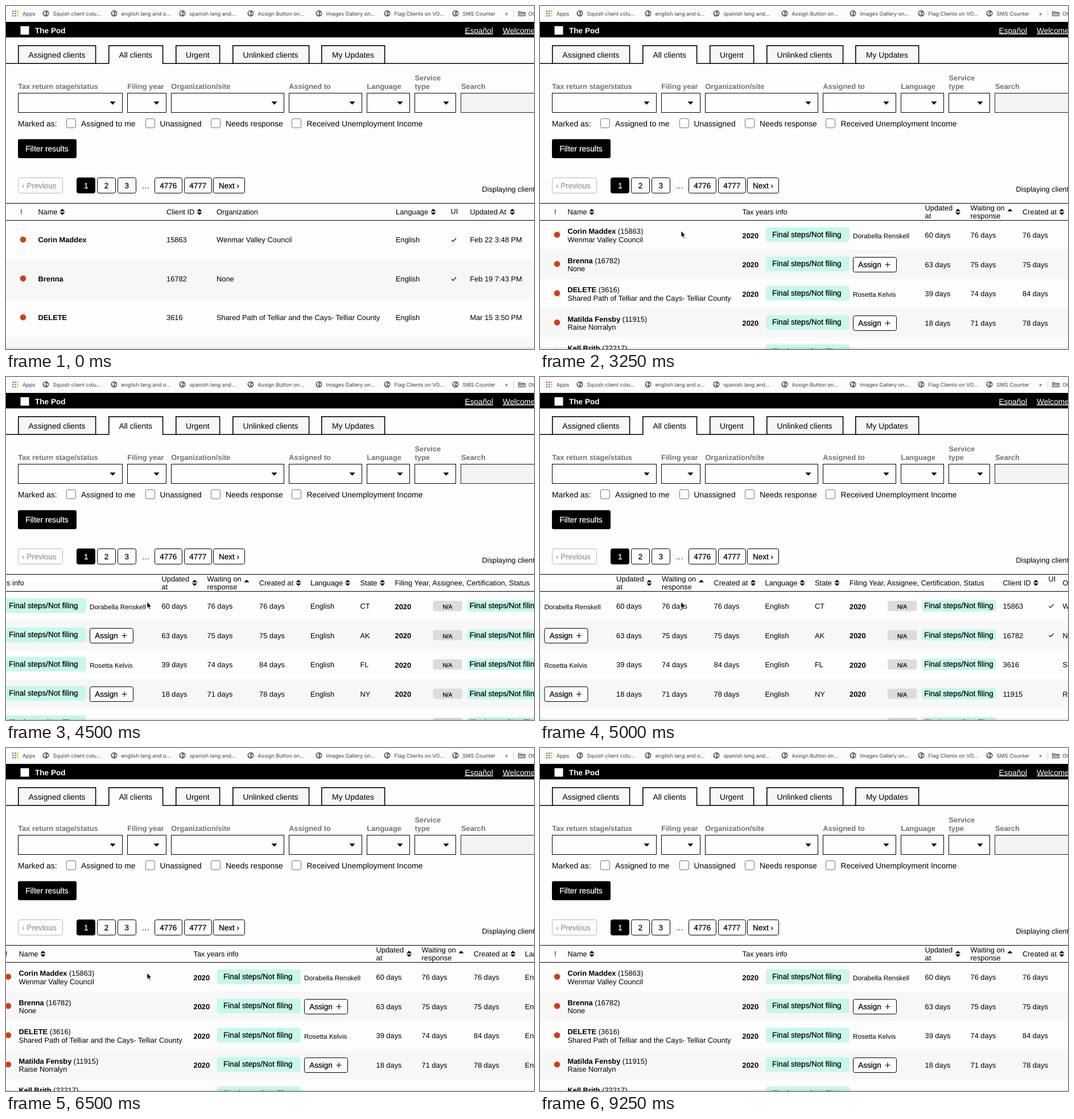
An HTML page for the animation above (9750 ms loop, 928 px wide and 604 px high).

```html
<!DOCTYPE html>
<html lang="en">
<head>
<meta charset="utf-8">
<title>Client list</title>
<style>
  html, body { margin: 0; width: 100%; height: 100%; overflow: hidden; background: #fdfdfd; }
  svg { display: block; width: 928px; height: 604px; }
  text { font: 12.85px "Liberation Sans", Arial, sans-serif; text-rendering: geometricPrecision; white-space: pre; }
  .ui { font-size: 13.85px; }
  .bold { font-weight: 700; }
  .label { font-weight: 700; fill: #737373; }
  .medium { font-size: 13.5px; stroke: #000; stroke-width: .25px; }
  .button { font-size: 13.85px; }
  .light { fill: #fff; stroke: #fff; }
  .off { fill: #999; stroke: #999; }
  .small { font-size: 11.8px; }
  .tag { font-size: 10.2px; stroke: #000; stroke-width: .25px; }
  .mark { font: 9.2px Inter, Roboto, sans-serif; fill: #3c4043; }
  .brand { font-size: 13.6px; font-weight: 700; fill: #fff; }
  .link { font-size: 13.7px; fill: #fff; text-decoration: underline; }

  #page, #wide, #squished, #scroller, #pointer { animation: 9.75s step-end infinite; }
  #wide { animation-name: leave; }
  #squished { animation-name: enter; }
  #scroller { animation-name: scroll; }
  #page { animation-name: bounce; }
  #pointer { animation-name: point; }

  @keyframes leave { 0% { visibility: visible; } 20.51%, 100% { visibility: hidden; } }
  @keyframes enter { 0% { visibility: hidden; } 20.51%, 100% { visibility: visible; } }
  @keyframes scroll {
    0% { transform: translate(0, 0); }
    33.33% { transform: translate(0, 0); animation-timing-function: steps(5, end); }
    46.15% { transform: translate(-403px, 0); animation-timing-function: steps(4, end); }
    56.41% { transform: translate(-682px, 0); }
    64.1% { transform: translate(-290px, 0); }
    66.66% { transform: translate(-26px, 0); }
    69.23%, 100% { transform: translate(0, 0); }
  }
  @keyframes bounce {
    0% { transform: translate(0, 0); }
    69.23% { transform: translate(4px, 0); }
    71.79% { transform: translate(2px, 0); }
    74.35% { transform: translate(1px, 0); }
    76.92%, 100% { transform: translate(0, 0); }
  }
  @keyframes point {
    0% { opacity: 0; transform: translate(541px, 207px); }
    2.56% { opacity: 1; transform: translate(541px, 207px); }
    5.12% { opacity: 1; transform: translate(450px, 145px); }
    7.69% { opacity: 1; transform: translate(285px, 58px); }
    10.25% { opacity: 1; transform: translate(160px, 9px); }
    12.82% { opacity: 1; transform: translate(121px, 14px); }
    15.38% { opacity: 1; transform: translate(118px, 14px); }
    23.07% { opacity: 1; transform: translate(182px, 95px); }
    25.64% { opacity: 1; transform: translate(238px, 205px); }
    28.2% { opacity: 1; transform: translate(247px, 366px); }
    30.76% { opacity: 1; transform: translate(248px, 396px); }
    76.92% { opacity: 1; transform: translate(248px, 250px); }
    79.48% { opacity: 1; transform: translate(249px, 147px); }
    84.61%, 100% { opacity: 0; transform: translate(249px, 147px); }
  }
</style>
</head>
<body>
<svg id="stage" viewBox="0 0 928 604" xmlns="http://www.w3.org/2000/svg">
  <defs>
    <linearGradient id="shade" x1="0" y1="0" x2="0" y2="1">
      <stop offset="0" stop-opacity="0"/>
      <stop offset="1" stop-opacity=".1"/>
    </linearGradient>
    <g id="globe">
      <circle r="5.6" fill="#5f6368"/>
      <path d="M-3.9-1.8Q-2.2-4-.4-3.6L.3-2.2-1.6-.6.2.8-.6 3.6Q-3.4 3-3.9-1.8ZM1.6-1.4 4-1.8Q4.8 1 2.6 3L1.4.8Z" fill="#f3f3f3"/>
    </g>
    <path id="up" d="M-4.6 0 0-4.4 4.6 0Z"/>
    <g id="sort"><use href="#up" y="-1"/><use href="#up" y="-1" transform="scale(1 -1)"/></g>
    <path id="check" d="M-4 .4-1.4 3 4.2-2.8" fill="none" stroke="#000" stroke-width="1.2"/>
  </defs>
  <g id="page"></g>
  <g id="bookmarks"></g>
  <rect y="600" width="928" height="4" fill="url(#shade)"/>
  <path id="pointer" d="M0 0V11.2L2.5 8.9 4.2 13 6 12.2 4.3 8.2H7.6Z" stroke="#fff" stroke-width=".8"/>
</svg>
<script>
const text = (x, y, s, cls = '') => `<text x="${x}" y="${y}" class="${cls}">${s}</text>`;
const box = (x, y, w, h, fill = 'none', r = 0, stroke = 'none', sw = 1) =>
  `<rect x="${x}" y="${y}" width="${w}" height="${h}" rx="${r}" fill="${fill}" stroke="${stroke}" stroke-width="${sw}"/>`;
const use = (id, x, y) => `<use href="#${id}" x="${x}" y="${y}"/>`;
const dot = y => `<circle cx="30" cy="${y}" r="5.3" fill="#d13f12"/>`;
const rule = (x, y, w, h = 1) => box(x, y, w, h, '#000');
const each = (list, fn) => list.map(fn).join('');

const clients = [
  { name: 'Corin Maddex', id: 15863, org: 'Wenmar Valley Council', owner: 'Dorabella Renskell',
    days: [60, 76, 76], state: 'CT', ui: true, at: 'Feb 22 3:48 PM' },
  { name: 'Brenna', id: 16782, org: 'None', days: [63, 75, 75], state: 'AK', ui: true, at: 'Feb 19 7:43 PM' },
  { name: 'DELETE', id: 3616, org: 'Shared Path of Telliar and the Cays- Telliar County', owner: 'Rosetta Kelvis',
    days: [39, 74, 84], state: 'FL', at: 'Mar 15 3:50 PM' },
  { name: 'Matilda Fensby', id: 11915, org: 'Raise Norralyn', days: [18, 71, 78], state: 'NY' },
  { name: 'Kell Brith', id: 22217, org: 'None', owner: 'Dorabella Renskell', days: [18, 71, 78], state: 'NY' }
];

function bookmarks() {
  const names = ['Squish client colu...', 'english lang and o...', 'spanish lang and...', 'Assign Button on...',
    'Images Gallery on...', 'Flag Clients on VO...', 'SMS Counter'];
  const colors = ['#ea4335', '#ea4335', '#f29900', '#34a853', '#4285f4', '#fbbc04', '#34a853', '#4285f4', '#fbbc04'];
  return box(0, 0, 928, 28, '#fcfcfc') +
    each(colors, (c, i) => box(11 + i % 3 * 4, 8 + Math.floor(i / 3) * 4, 2.5, 2.5, c, .8)) +
    text(29, 16.5, 'Apps', 'mark') +
    each(names, (s, i) => use('globe', 70 + i * 120, 13) + text(82.5 + i * 120, 16.5, s, 'mark')) +
    text(877, 16.5, '»', 'mark') + box(892, 7, 1, 13, '#d0d0d0') +
    '<path d="M900.5 9.5h4l1.5 1.5h6.5v6.5h-12z" fill="#bdbdbd" stroke="#5f6368"/><path d="M900.5 12.5h12" stroke="#5f6368"/>' +
    text(918, 16.5, 'Other', 'mark');
}

function header() {
  const tabs = [[21, 137, 39.5, 'Assigned clients'], [180, 96, 198.5, 'All clients'], [298, 78, 316, 'Urgent'],
    [398, 135, 416.5, 'Unlinked clients'], [554, 112, 573, 'My Updates']];
  return box(-20, 28, 980, 27.3, '#000') + box(25.5, 35.5, 15, 15, '#fff') +
    text(51, 47.5, 'The Pod', 'brand') +
    text(806.5, 47.5, 'Español', 'link') + text(873, 47.5, 'Welcome', 'link') +
    rule(-20, 100.5, 980, 1.5) +
    each(tabs, ([x, w, tx, s], i) =>
      box(x + .8, 69.8, w - 1.2, 31.4, i === 1 ? '#fdfdfd' : '#f7f7f7', 0, '#000', 1.6) +
      (i === 1 ? box(x + 1.6, 99, w - 2.8, 5, '#fdfdfd') : '') + text(tx, 90.5, s, 'ui'));
}

function filters() {
  const selects = [[21, 205, 'Tax return stage/status'], [213, 282, 'Filing year'], [290, 489, 'Organization/site'],
    [497, 626, 'Assigned to'], [634, 710, 'Language'], [718, 791, '']];
  const checks = [[106, 132, 'Assigned to me'], [245, 270.5, 'Unassigned'], [360, 386, 'Needs response'],
    [502, 528.5, 'Received Unemployment Income']];
  return each(selects, ([a, b, s]) => text(a + .3, 146, s, 'label') +
      box(a + .5, 153.5, b - a - 1, 34, '#fefefe', 0, '#000') +
      `<path d="M${b - 22.5} 168.2h10l-5 5.5z"/>`) +
    text(718.5, 131, 'Service', 'label') + text(718.5, 146, 'type', 'label') + text(800, 146, 'Search', 'label') +
    box(799.5, 153.5, 160, 34, '#f4f4f4', 0, '#222') + box(800, 154, 160, 1, '#d5d5d5') +
    text(21, 212, 'Marked as:', 'ui') +
    each(checks, ([x, tx, s]) => box(x + .5, 198.5, 16, 16, '#fff', 2.5, '#767676') + text(tx, 212, s, 'ui')) +
    box(21, 234.5, 103, 33.5, '#000', 3) + text(34.3, 256, 'Filter results', 'medium button light');
}

function pager() {
  const pages = [[124, 157, 137, '1'], [160, 193, 172.7, '2'], [196, 229, 208.6, '3'],
    [261, 310, 270.2, '4776'], [313, 362, 322.2, '4777'], [364, 420, 374, 'Next ›']];
  return box(21.5, 302.5, 78, 27, 'none', 3, '#b8b8b8') + text(28, 320.6, '‹ Previous', 'medium off') +
    each(pages, ([a, b, tx, s], i) => box(a + .5, 302.5, b - a - 1, 27, i ? 'none' : '#000', 3, '#000') +
      text(tx, 320.6, s, 'medium' + (i ? '' : ' light'))) +
    text(238.5, 320.6, '…', 'ui') + text(836.5, 327, 'Displaying clients');
}

const frame = () => rule(-20, 347, 2400) + rule(-20, 377, 2400);

function wideTable() {
  const heads = [[25, 367, '!'], [56.5, 367, 'Name', 99], [282, 367, 'Client ID', 340], [370, 366.5, 'Organization'],
    [685, 367, 'Language', 751], [781.5, 365.5, 'UI'], [815.5, 367, 'Updated At', 890]];
  return box(-20, 447, 2400, 68.5, '#f7f7f7') + box(-20, 584, 2400, 30, '#f7f7f7') + frame() +
    each(heads, ([x, y, s, icon]) => text(x, y, s) + (icon ? use('sort', icon, 362.5) : '')) +
    each(clients.slice(0, 3), (c, i) => {
      const y = 416.3 + i * 68.5;
      return dot(y - 5) + text(56.5, y, c.name, 'bold') + text(282, y, c.id) + text(370, y, c.org) +
        text(685, y, 'English') + (c.ui ? use('check', 787, y - 4.5) : '') + text(815.5, y, c.at);
    });
}

function squishedRow(c, i) {
  const y = 378 + i * 51.5;
  const owner = c.owner ? text(550, y + 31, c.owner, 'small')
    : box(550.5, y + 13, 76, 26, '#fefefe', 3, '#000') + text(559.3, y + 30.3, 'Assign', 'medium') +
      `<path d="M606.5 ${y + 26}h9m-4.5-4.5v9" stroke="#000" stroke-width="1.1"/>`;
  return (i % 2 ? box(-20, y, 2400, 51.5, '#f7f7f7') : '') + dot(y + 24.8) +
    `<text x="48.5" y="${y + 23}"><tspan font-weight="700">${c.name}</tspan> (${c.id})</text>` +
    text(48.5, y + 37.8, c.org) + text(355.5, y + 30.8, '2020', 'bold') +
    box(397, y + 11.8, 147, 25.6, '#c7f8ea', 4) + text(408, y + 28.8, 'Final steps/Not filing', 'medium') + owner +
    each(c.days, (d, k) => text([676.5, 756.5, 848][k], y + 30.2, d + ' days')) +
    text(938, y + 30.2, 'English') + text(1025.5, y + 30.2, c.state) + text(1086.5, y + 30.8, '2020', 'bold') +
    box(1153.5, y + 16.3, 51.3, 18, '#dcdcdc', 3.5) + text(1170.5, y + 30, 'N/A', 'tag') +
    box(1214, y + 15, 130, 20, '#c7f8ea', 4) + text(1217.8, y + 29.3, 'Final steps/Not filing', 'medium') +
    text(1356, y + 30.2, c.id) + (c.ui ? use('check', 1441, y + 25) : '') + text(1461, y + 30.2, c.org);
}

function squishedTable() {
  const heads = [[25, 367, '!'], [48.5, 367, 'Name', 91], [355.5, 366.7, 'Tax years info'],
    [676.5, 360, 'Updated', 734.5], [676.5, 374, 'at'], [756.5, 360, 'Waiting on'], [756.5, 374, 'response'],
    [848, 367, 'Created at', 917], [938, 367, 'Language', 1003.5], [1025.5, 367, 'State', 1064.5],
    [1086.5, 366.7, 'Filing Year, Assignee, Certification, Status'], [1356, 367, 'Client ID', 1414],
    [1436, 360, 'UI'], [1461, 366.7, 'Organization']];
  return each(clients, squishedRow) + frame() +
    each(heads, ([x, y, s, icon]) => text(x, y, s) + (icon ? use('sort', icon, 362.5) : '')) + use('up', 826, 361.5);
}

document.getElementById('page').innerHTML = header() + filters() + pager() +
  `<g id="wide">${wideTable()}</g><g id="squished"><g id="scroller">${squishedTable()}</g></g>`;
document.getElementById('bookmarks').innerHTML = bookmarks();
</script>
</body>
</html>
```
